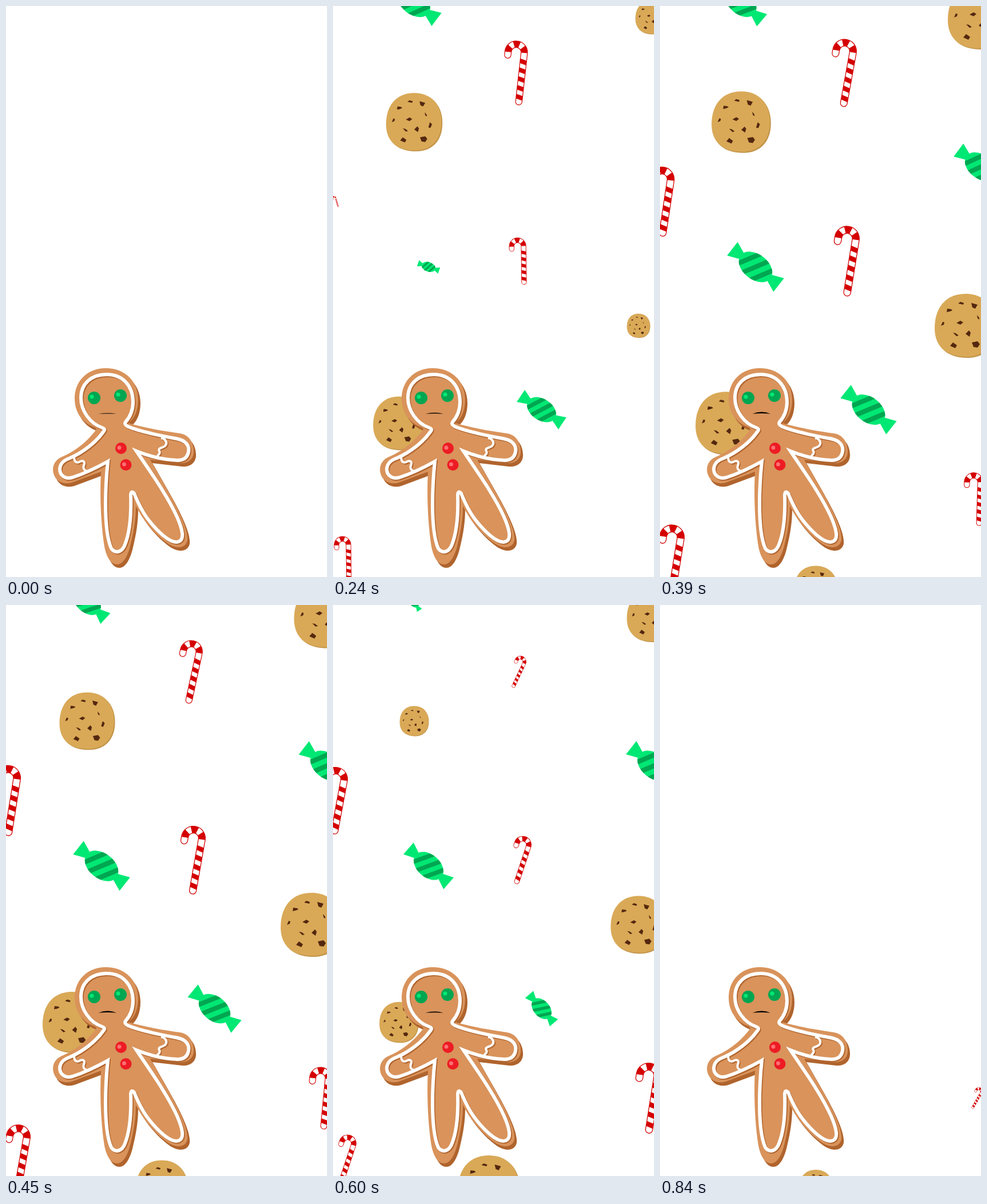
Recreate the animation shown at these times as an HTML page. Size 561x998 px, loop 870 ms.

```html
<!DOCTYPE html>
<html lang="en">
<head>
<meta charset="utf-8">
<title>Gingerbread and sweets</title>
<style>
  html, body { margin: 0; width: 100%; height: 100%; overflow: hidden; background: #fff; }
  svg { display: block; width: 100vw; height: 100vh; }
</style>
</head>
<body>
<svg viewBox="0 0 561 998" xmlns="http://www.w3.org/2000/svg">
  <defs>
    <path id="stick" d="M-23 -32V-39A15.5 15.5 0 0 1 8 -39V54.5" fill="none" stroke-linecap="round"/>
    <g id="cane">
      <use href="#stick" stroke="#d50000" stroke-width="13.6"/>
      <use href="#stick" stroke="#fff" stroke-width="11"/>
      <path fill="none" stroke="#d50000" stroke-width="12.4" stroke-dasharray="11 8" stroke-dashoffset="-6"
        d="M-23 -32V-39A15.5 15.5 0 0 1 8 -39"/>
      <path id="bands" fill="#d50000"/>
    </g>

    <clipPath id="drop"><ellipse rx="33" ry="22"/></clipPath>
    <g id="candy">
      <path fill="#00e874" d="M-51.5 -15V15L-25 4V-4ZM51.5 -15V15L25 4V-4Z"/>
      <ellipse rx="33" ry="22" fill="#00e874"/>
      <g clip-path="url(#drop)">
        <path transform="rotate(-61)" stroke="#00a651" stroke-width="8.5"
          d="M-45 -17.5H45M-45 0H45M-45 17.5H45"/>
      </g>
    </g>

    <path id="disc" d="M-54 4C-54 -30 -36 -56 0 -56C34 -56 52 -32 52 0C52 36 30 54 2 54C-32 54 -54 38 -54 4Z"/>
    <g id="cookie">
      <use href="#disc" x="2" y="2" fill="#c3954a"/>
      <use href="#disc" fill="#d9a957"/>
      <path fill="#54280f" d="M-33 -24L-32 -30L-25 -29L-23 -27L-28 -25Z
        M-13 -39L-9 -42L-3 -40L-4 -37Z M10 -40L21 -37L17 -30L12 -32Z
        M20 -19L24 -14L24 -11L21 -13Z M-43 0L-40 -7L-37 -6L-38 -2Z
        M-16 -5L-9 -9L-4 -6L-9 -2Z M27 10L30 0L34 4L31 11Z
        M-22 12L-17 13L-12 17L-16 18Z M0 14L6 8L9 12L7 19L4 17Z
        M-27 35L-22 29L-15 34L-18 39Z M11 29L21 27L25 32L21 38L14 37Z"/>
    </g>

    <path id="dough" d="M174 633C143 633 120 655 120 686C120 708 131 726 151 735Q157 737 158 740
      C140 764 120 778 100 787C84 793 80 806 83 817C87 831 100 837 115 833L166 814
      C164 850 165 900 172 945C176 965 184 976 194 976C206 976 214 958 218 940
      C224 915 227 895 227 874C240 900 262 925 282 939C298 950 314 948 317 934
      C319 918 305 888 290 860C278 838 264 814 252 793L304 799C320 800 329 790 328 777
      C327 760 318 749 304 747C276 743 240 737 214 729C226 720 231 705 231 688
      C231 656 208 633 174 633Z"/>
    <g id="icing" fill="none" stroke-width="6" stroke-miterlimit="4">
      <path d="M168 737C147 730 131 707 131 685C131 660 149 644 176 644C204 644 222 664 222 692
        C222 706 217 718 209 727Q206 731 213 735C232 743 264 750 297 756C314 759 321 768 319 779
        C317 790 310 794 300 794C275 793 250 787 228 778C250 811 282 855 299 893
        C309 916 312 932 302 936C288 942 262 916 246 894C234 877 230 866 224 852
        Q219 846 218 854C219 885 217 918 208 941C203 955 191 958 184 948
        C176 930 174 895 174 870C174 845 176 815 178 796C160 806 135 818 116 824
        C102 828 94 819 94 809C95 799 101 794 112 790C135 780 158 762 171 743Q174 739 168 737Z"/>
      <path stroke-width="4" d="M119 787C119 797 123 799 128 797C135 793 139 797 136 803C134 809 138 812 141 813
        M271 755C279 756 283 764 278 769C273 773 265 772 268 778C271 783 265 784 264 788"/>
    </g>
    <g id="eye">
      <circle r="11" fill="#00a651"/><circle cx="-4" cy="-2" r="3.6" fill="#00e874"/>
    </g>
    <g id="button">
      <circle r="10" fill="#ed1c24"/><circle cx="-3" cy="-1" r="3.5" fill="#ff7074"/>
    </g>
  </defs>

  <rect width="561" height="998" fill="#fff"/>
  <g id="sweets"></g>
  <g id="man">
    <use href="#dough" x="4" y="6" fill="#b0642d"/>
    <use href="#dough" fill="#d9935b"/>
    <use href="#icing" x="1.6" y="1.8" stroke="#b0642d"/>
    <use href="#icing" stroke="#fff"/>
    <use href="#eye" x="154" y="685"/>
    <use href="#eye" x="200" y="681"/>
    <use href="#button" x="201" y="773"/>
    <use href="#button" x="209.5" y="802"/>
    <path id="mouth"/>
  </g>
</svg>
<script>
const LOOP = 870;
// The picture is held between these times; beats give the phase of each hold.
const times = [0, 90, 120, 180, 240, 270, 300, 360, 390, 450, 540, 600, 630, 690, 720, 750, 780, 840];
const beats = [0, 1, 2, 3, 4, 5, 6, 7, 8, 8.75, 10, 11, 12, 13, 14, 14.67, 15.33, 16];

// kind, x, y, beat of growth, beat of shrinking
const sweets = [
  ['cane', 323, 117, 0.6, 6.32],
  ['cane', 328, 446, 2, 7.22],
  ['cane', 22, 968, 2, 7.22],
  ['cane', 5, 342, 3.6, 9.2],
  ['cane', 553, 862, 5.6, 10.85],
  ['candy', 141.5, -6, 0.1, 5.95],
  ['candy', 364.5, 705.5, 1.1, 7],
  ['candy', 167, 456, 3.03, 8.63],
  ['candy', 561, 281, 4.2, 9.98],
  ['cookie', 142, 203, 0.6, 6.35],
  ['cookie', 115.5, 729.5, 1.15, 7],
  ['cookie', 557, 20, 2.55, 7.88],
  ['cookie', 534, 559, 3.03, 8.63],
  ['cookie', 272.5, 1018, 5.85, 11.65]
];
const tilt = { cane: 9, candy: 38 };
const mouthKeys = [[0, 0], [3, 0], [6, 0.8], [8.75, 0.9], [10, 0.1], [13, 1.1], [16, 0.9]];

const byId = id => document.getElementById(id);
const layer = byId('sweets');
const mouth = byId('mouth');
const nodes = sweets.map(([kind]) => {
  const node = document.createElementNS('http://www.w3.org/2000/svg', 'use');
  node.setAttribute('href', '#' + kind);
  return layer.appendChild(node);
});

// Slanted bands down the straight part of the cane.
let bands = '';
for (let y = -28; y < 45; y += 17) bands += `M1.8 ${y}l12.4 3v8.8l-12.4 -3z`;
byId('bands').setAttribute('d', bands);

const clamp = v => Math.max(0, Math.min(1, v));
const rise = b => 1 - Math.pow(1 - clamp(b / 5.2), 2.3);
const fall = b => 1 - Math.pow(clamp(b / 6), 2.5);

function lerpKeys(keys, b) {
  for (let i = 1; i < keys.length; i++) {
    const [b0, v0] = keys[i - 1], [b1, v1] = keys[i];
    if (b <= b1) return v0 + (v1 - v0) * (b - b0) / (b1 - b0);
  }
  return keys[keys.length - 1][1];
}

function draw(ms) {
  const t = ms % LOOP;
  let i = times.length - 1;
  while (times[i] > t) i--;
  const beat = beats[i];

  sweets.forEach(([kind, x, y, start, end], n) => {
    const up = rise(beat - start), down = fall(beat - end);
    const size = Math.min(up, down);
    const angle = kind in tilt ? tilt[kind] + 30 * (up - down) : 0;
    nodes[n].setAttribute('visibility', size > 0.01 ? 'visible' : 'hidden');
    nodes[n].setAttribute('transform', `translate(${x} ${y}) rotate(${angle}) scale(${size})`);
  });

  const open = lerpKeys(mouthKeys, beat);
  mouth.setAttribute('d', `M161.5 712.8Q178 ${710 - 4.5 * open} 193 712.8Q178 ${712.2 - open} 161.5 712.8Z`);
}

const began = performance.now();
function tick() {
  draw(performance.now() - began);
  requestAnimationFrame(tick);
}
draw(0);
requestAnimationFrame(tick);
</script>
</body>
</html>
```
